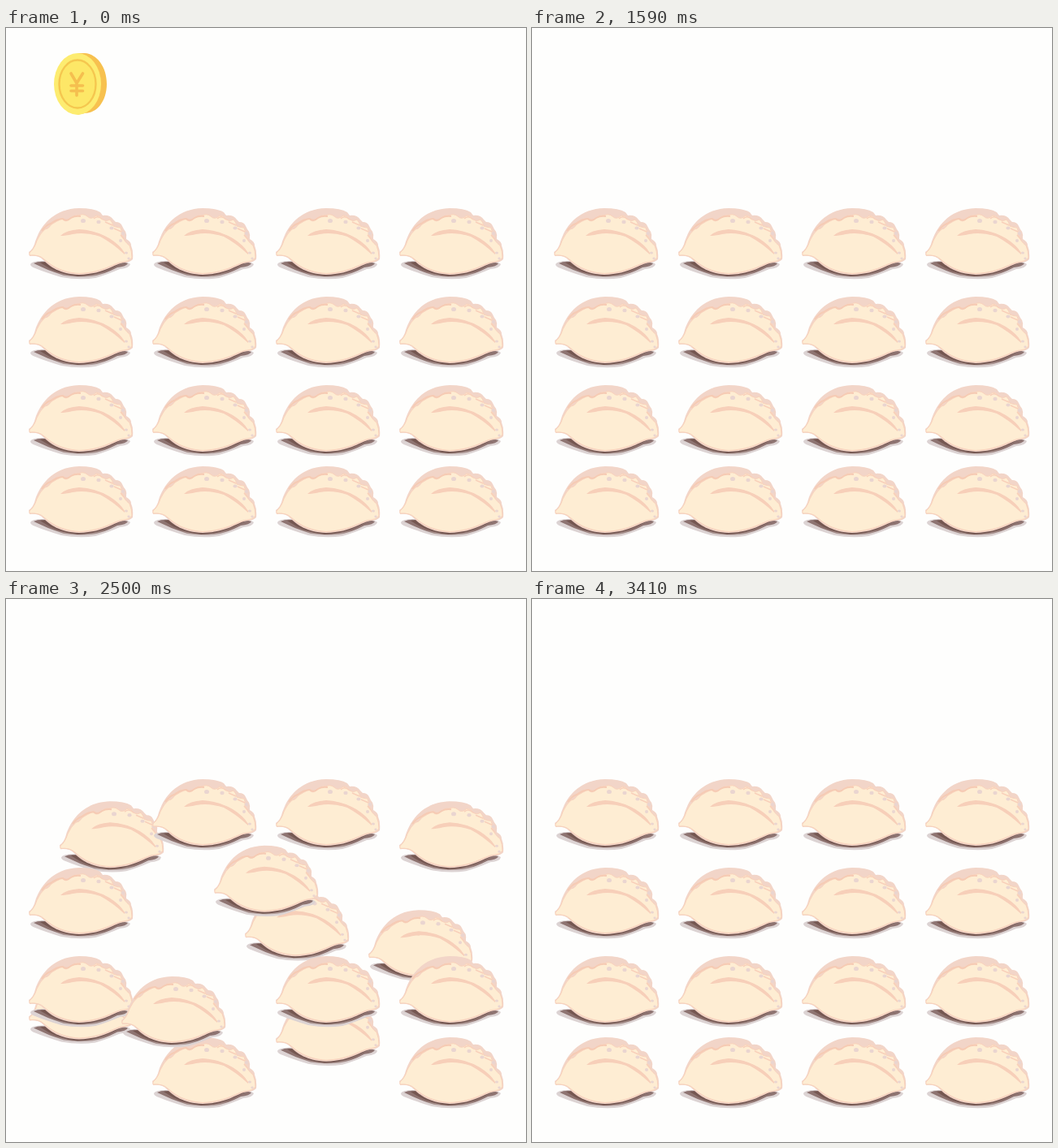
Write an HTML page that moves like this. It is 640 px wide and 669 px high and loops after 3.88 s.

```html
<!DOCTYPE html>
<html lang="en">
<head>
<meta charset="utf-8">
<title>Dumpling shuffle</title>
<style>
  html, body { margin: 0; width: 100%; height: 100%; overflow: hidden; background: #fefefd; }
  svg { display: block; width: 100%; height: 100%; }
</style>
</head>
<body>
<svg viewBox="0 0 640 669">
  <defs>
    <linearGradient id="shade" x1="0" y1="64" x2="0" y2="88" gradientUnits="userSpaceOnUse">
      <stop offset="0" stop-color="#8f7674"/>
      <stop offset=".6" stop-color="#8c706c"/>
      <stop offset="1" stop-color="#cdbfbd"/>
    </linearGradient>
    <g id="dumpling">
      <!-- shadow -->
      <path fill="#dcd3d3" d="M2 69Q4 65 17 65L110 66Q123 66 125 69Q124 74 112 75Q96 82 82 86Q62 89 40 85Q20 79 8 74Q2 72 2 69Z"/>
      <path fill="url(#shade)" d="M6 68Q12 65 20 66L108 67Q118 66 122 68Q120 72 109 73Q92 82 78 84Q60 86 43 83Q24 77 6 68Z"/>
      <path fill="#755751" d="M14 67L22 66L106 68L114 68Q104 73 94 77Q78 84 60 84Q36 82 14 67Z"/>
      <!-- back rim -->
      <path fill="#f2d5c8" d="M0 54Q6 50 8 41C13 26 27 1 62 0Q80 0 88 5L91 9Q100 8 104 14L107 17Q113 17 115 22L117 26Q121 30 120 35L120 38Q126 41 126 46Q129 53 128 63Q124 67 118 67C105 68 95 81 62 82C38 81 26 72 18 64Q13 58 1 59Z"/>
      <!-- front -->
      <path fill="#feedd3" stroke="#f9d2bb" stroke-width="1" d="M1 55Q7 50 10 40Q14 31 20 26Q24 26 28 20Q34 16 41 13Q45 18 50 14Q55 8 61 9Q67 6 72 10Q77 15 83 9Q88 9 91 14Q95 17 100 14Q103 17 104 22Q109 24 113 24Q115 28 114 33Q118 37 118 40Q121 44 124 46Q127 53 127 61Q123 66 117 66C104 67 94 79 62 80.500C39 79 27 70 19 63Q13 57 1 58Z"/>
      <path fill="none" stroke="#f6cbb4" stroke-width="2" d="M16 28Q21 21 27 19Q35 13 42 13Q46 17 52 12Q57 9 64 10"/>
      <path fill="none" stroke="#f8d0ba" stroke-width="1.500" d="M80 13Q85 8 91 14M94 17L103 21M105 25L114 29M113 33L118 39"/>
      <!-- crease -->
      <path fill="#f7cfb9" d="M39 34Q46 27 62 26Q82 27 99 37Q112 45 118 55L118 57Q103 43 88 35Q70 29 54 32Q45 34 39 34Z"/>
      <g fill="#ead5d0">
        <ellipse cx="67" cy="15.500" rx="3" ry="2.600"/>
        <ellipse cx="86" cy="17" rx="2.600" ry="2.200"/>
        <ellipse cx="102" cy="24.500" rx="2.600" ry="2"/>
        <ellipse cx="116" cy="31" rx="2.400" ry="2"/>
        <ellipse cx="113" cy="40" rx="2" ry="2"/>
        <ellipse cx="120" cy="55" rx="2" ry="1.600"/>
        <ellipse cx="123" cy="62" rx="1.600" ry="1.400"/>
      </g>
    </g>
  </defs>
  <g id="coin">
    <path fill="#f7c14f" d="M88 31H97C112 32 124 48 124 69S112 105 97 105L88 107Z"/>
    <ellipse cx="88" cy="69" rx="29" ry="38" fill="#fdec70"/>
    <ellipse cx="88" cy="69" rx="22.500" ry="29.500" fill="#fde767" stroke="#f5c74f" stroke-width="2.400"/>
    <path fill="none" stroke="#f5bf4f" stroke-width="3.600" stroke-linecap="round" d="M80 56L87 68L94.500 56M87 68V83M80 71H94.500M80 77.500H94.500"/>
  </g>
  <g id="sparks" fill="#fbe26a"></g>
  <g id="tray"></g>
</svg>
<script>
const LOOP = 3880, STEP = 70, DROP_START = 330, SHUFFLE_START = 1800, MOVE_STEPS = 4;
const COLS = [28, 180, 332, 484], ROWS = [222, 331, 440, 540];
const SPARKS = [[-80, 0], [-48, -51], [6, -76], [55, -51], [80, 0]];

// Each dumpling moves to the next slot of its cycle; "under" ones pass below the rest.
const ROUNDS = [
  { cycle: [0, 5, 11, 13, 8, 2], under: [8, 2] },
  { cycle: [2, 8, 6, 15, 14], under: [15, 8] },
  { cycle: [5, 0, 12, 9, 6, 14, 7, 3], under: [0, 6, 9, 14, 5] },
  { cycle: [1, 6, 12, 10, 15, 3], under: [12, 3] },
  { cycle: [13, 7, 2, 0, 1, 9, 11], under: [2, 7] },
  { cycle: [0, 9, 14, 11, 4, 2, 7], under: [4, 14] }
];
const REST = { cycle: [], under: [] };

const byId = id => document.getElementById(id);
const coin = byId('coin'), sparks = byId('sparks'), tray = byId('tray');

function add(parent, tag) {
  return parent.appendChild(document.createElementNS('http://www.w3.org/2000/svg', tag));
}
const slots = Array.from({ length: 16 }, (_, i) => [COLS[i % 4], ROWS[i >> 2]]);
const dumplings = slots.map(() => {
  const el = add(tray, 'use');
  el.setAttribute('href', '#dumpling');
  return el;
});
const dots = SPARKS.map(() => add(sparks, 'circle'));

const move = (el, x, y) => el.setAttribute('transform', `translate(${x} ${y})`);
const show = (el, on) => el.setAttribute('visibility', on ? 'visible' : 'hidden');

let stacked = null;
function stack(round) {
  if (round === stacked) return;
  stacked = round;
  const { cycle, under } = round;
  const still = slots.map((_, i) => i).filter(i => !cycle.includes(i));
  const over = cycle.filter(i => !under.includes(i));
  [...under, ...still, ...over].forEach(i => tray.appendChild(dumplings[i]));
}

function drawDrop(k) {
  show(coin, k < 5);
  move(coin, 0, 193 * (k / 5) ** 1.3);

  show(sparks, k >= 5 && k <= 10);
  const spread = 1 - (1 - Math.min(1, Math.max(0, (k - 4) / 6))) ** 3;
  dots.forEach((dot, i) => {
    dot.setAttribute('cx', 85 + SPARKS[i][0] * spread);
    dot.setAttribute('cy', 264 + SPARKS[i][1] * spread);
    dot.setAttribute('r', Math.max(0, 5.6 - 0.4 * k));
  });
}

function wobble(k) {
  if (k <= 9) return 0;
  return k < 19 ? -10 * Math.sin((k - 9) / 10 * 2 * Math.PI) : -1;
}

function draw(ms) {
  const k = Math.max(0, Math.floor((ms - DROP_START) / STEP) + 1);
  drawDrop(k);

  const n = Math.floor((ms - SHUFFLE_START) / STEP);
  const round = n >= 0 && ROUNDS[Math.floor(n / MOVE_STEPS)] || REST;
  const t = (n % MOVE_STEPS + 1) / MOVE_STEPS;
  stack(round);
  slots.forEach(([x, y], i) => {
    const at = round.cycle.indexOf(i);
    if (at >= 0) {
      const [toX, toY] = slots[round.cycle[(at + 1) % round.cycle.length]];
      x += (toX - x) * t;
      y += (toY - y) * t;
    } else if (i === 0 && n < 0) {
      x += wobble(k);
    }
    move(dumplings[i], x, y);
  });
}

const start = performance.now();
function tick() {
  draw((performance.now() - start) % LOOP);
  requestAnimationFrame(tick);
}
tick();
</script>
</body>
</html>
```
